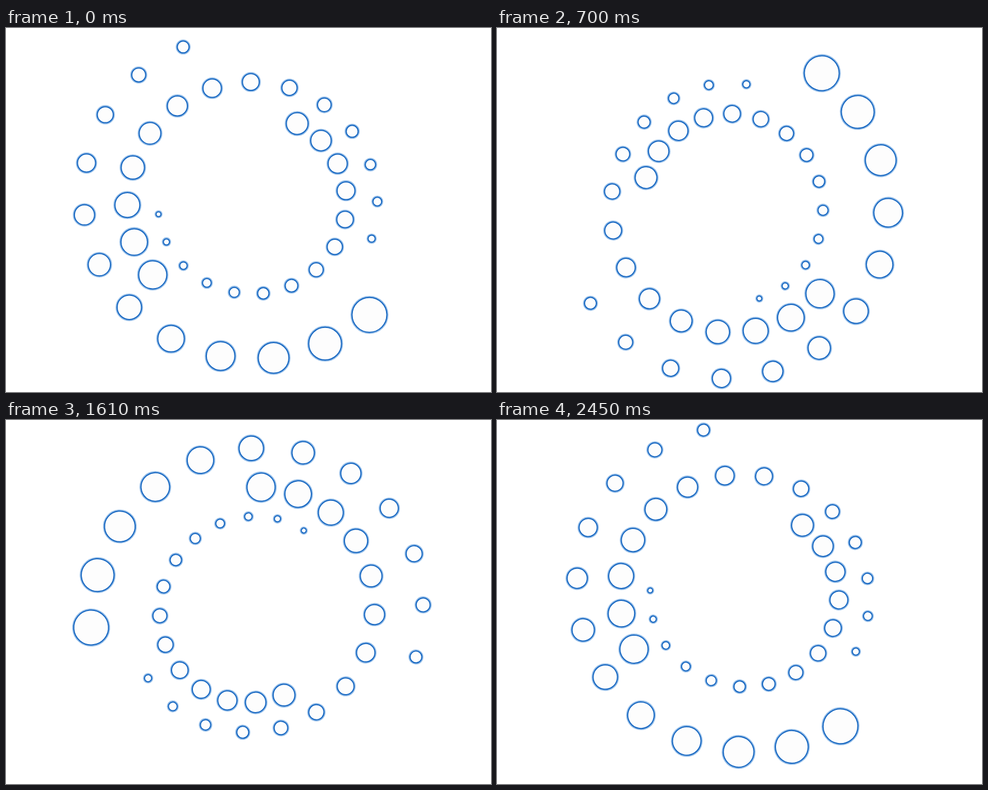
Recreate the animation shown at these times as an HTML page. Size 864 by 648 pixels, loop 2.52 s.

```html
<!DOCTYPE html>
<html lang="en">
<head>
<meta charset="utf-8">
<title>Turning rings</title>
<style>
  html, body { margin: 0; width: 100%; height: 100%; overflow: hidden; background: #fff; }
  svg { display: block; width: 100vw; height: 100vh; }
  .ring { fill: #fdfdfd; stroke: #1767c1; stroke-width: 2; }
  .halo { fill: none; stroke: #4a90d9; stroke-width: 2.4; stroke-opacity: .6; }
</style>
</head>
<body>
<svg viewBox="0 0 864 648"><g id="wheel"></g></svg>
<script>
const LOOP = 2520, STEP = 70, STEPS = LOOP / STEP;
const CX = 432.5, CY = 324.5;
const wheel = document.getElementById('wheel');

// Each chain shrinks evenly along a smooth curve through a few [distance, angle] keys.
const chains = [
  { count: 12, from: 31, to: 10.5,
    keys: [[284.4, 40.9], [273.1, 61.2], [266.3, 117.2], [294.6, 182], [310.5, 230], [313.3, 248.1]] },
  { count: 14, from: 25, to: 6.3,
    keys: [[206.1, 146.1], [213, 168.9], [224.1, 226.6], [230.4, 297.2], [230.2, 352.1], [224.6, 373]] },
  { count: 14, from: 19.3, to: 4.3,
    keys: [[176.8, 299.2], [178.9, 320], [169.6, 374], [148.9, 450.2], [156, 514.4], [160.9, 537.5]] }
];

const mix = (a, b, u) => a + (b - a) * u;

// Polynomial through the keys, which sit at cosine-spaced places from 0 to 1.
function along(keys, u) {
  const at = keys.map((_, j) => (1 - Math.cos(j * Math.PI / (keys.length - 1))) / 2);
  let dist = 0, angle = 0;
  keys.forEach(([d, a], j) => {
    const w = at.reduce((p, v, k) => k === j ? p : p * (u - v) / (at[j] - v), 1);
    dist += w * d;
    angle += w * a;
  });
  return [dist, angle * Math.PI / 180];
}

function addCircle(cls, x, y, r) {
  const c = document.createElementNS('http://www.w3.org/2000/svg', 'circle');
  c.setAttribute('class', cls);
  c.setAttribute('cx', x.toFixed(2));
  c.setAttribute('cy', y.toFixed(2));
  c.setAttribute('r', r.toFixed(2));
  wheel.appendChild(c);
}

for (const { count, from, to, keys } of chains) {
  for (let i = 0; i < count; i++) {
    const u = i / (count - 1);
    const [d, a] = along(keys, u);
    const x = CX + d * Math.cos(a), y = CY + d * Math.sin(a);
    const r = mix(from, to, u);
    addCircle('halo', x, y, r + 1.6);
    addCircle('ring', x, y, r);
  }
}

function draw(ms) {
  const step = Math.floor((ms % LOOP) / STEP);
  wheel.setAttribute('transform', `rotate(${-360 * step / STEPS} ${CX} ${CY})`);
}

const start = performance.now();
function tick() {
  draw(performance.now() - start);
  requestAnimationFrame(tick);
}
draw(0);
requestAnimationFrame(tick);
</script>
</body>
</html>
```
